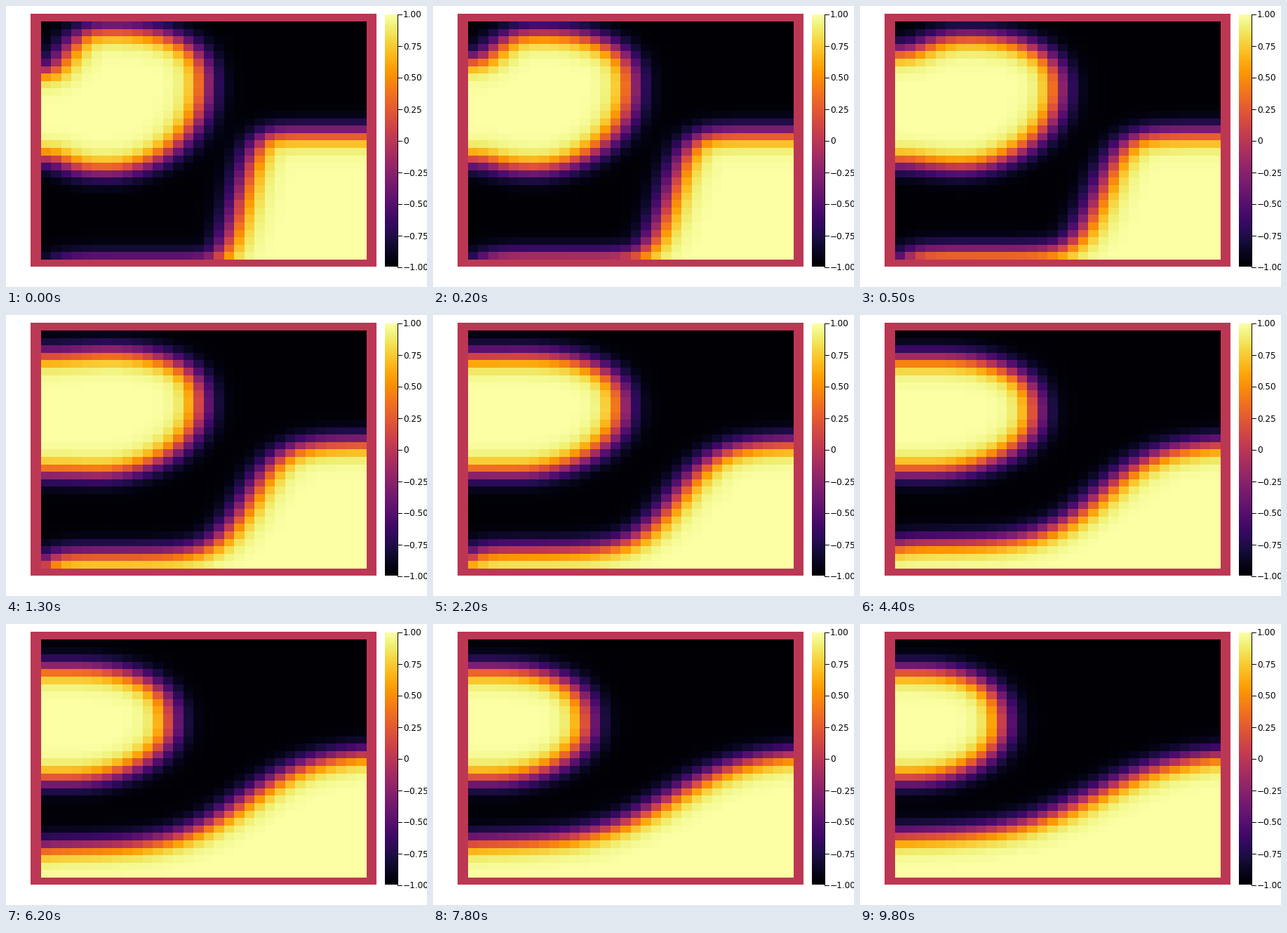
These frames come from a looping animation (600 by 400 pixels, 10 s). A matplotlib script:

```python
import numpy as np
import matplotlib.pyplot as plt
from matplotlib.animation import FuncAnimation

N = 32                      # inner cells per side; a ring of zeros surrounds them
FRAMES, INTERVAL = 100, 100
SHARPNESS = 0.62            # steepness of the tanh profile across an interface

COL, ROW = np.meshgrid(np.arange(N), np.arange(N))


def decay(t, tau):
    return np.exp(-t / tau)


def interface(xs, ys, inside):
    """Tanh profile of the signed distance from each cell to a curve."""
    d2 = (COL[..., None] - xs) ** 2 + (ROW[..., None] - ys) ** 2
    return np.tanh(SHARPNESS * np.where(inside, 1, -1) * np.sqrt(d2.min(axis=-1)))


def drop(t):
    """Upper drop: flat core with a round cap that retreats to the left."""
    reach = min(15.6, 16 - 0.6 * t)
    core = 6 * decay(t, 6)
    centre = 11 - 3 * decay(t, 2.2)
    top = 2.95 + 0.07 * t - 2.35 * decay(t, 1.1)
    bottom = 18.65 - 0.04 * t + 0.9 * decay(t, 0.9)
    notch_width = 2.6 + 1.5 * t

    def height(x, edge, power, notch):
        x = np.abs(x)
        cap = np.clip((x - core) / (reach - core), 0, 1)
        round_off = (1 - cap ** power) ** (1 / power)
        return centre + (edge - centre) * round_off + notch * np.exp(-(x / notch_width) ** 2)

    upper = (top, 2.5, 5.4 * decay(t, 0.5))
    lower = (bottom, 2, -1.6 * decay(t, 0.6))
    x = reach * np.sin(np.linspace(-np.pi / 2, np.pi / 2, 400))
    inside = (COL < reach) & (ROW > height(COL, *upper)) & (ROW < height(COL, *lower))
    return interface(np.r_[x, x], np.r_[height(x, *upper), height(x, *lower)], inside)


def slope(t):
    """Lower region: an S-shaped front that flattens by diffusion."""
    right = 14.55
    left = 29.85 - 0.4 * t + 2 * decay(t, 0.6)
    middle = 20.3 - 0.11 * t - 1.2 * decay(t, 0.8)
    width = np.sqrt(0.64 + 1.7 * t)

    def height(x):
        x = np.abs(x)
        lag = 2.5 * decay(t, 2) * np.exp(-x)
        return right + (left - right) / (1 + np.exp((x - middle) / width)) + lag

    x = np.linspace(-4, 36, 800)
    return interface(x, height(x), ROW > height(COL))


def field(t):
    return np.pad(np.clip(drop(t) + slope(t) + 1, -1, 1), 1)


fig = plt.figure(figsize=(6, 4), dpi=100, facecolor="white")
ax = fig.add_axes([0, 0, 1, 1])
style = dict(cmap="inferno", vmin=-1, vmax=1, antialiased=False)
cells = np.arange(N + 3)
heat = ax.pcolormesh(np.round(35.49 + 14.5 * cells), np.round(11.48 + 360 / 34 * cells),
                     field(0), **style)
ax.pcolormesh([540, 558], np.linspace(12, 371, 257),
              np.linspace(1, -1, 256)[:, None], **style)

AXIS = 557.5
ax.plot([AXIS, AXIS], [11.5, 371.5], color="black", lw=0.72)
for value in np.linspace(-1, 1, 9):
    y = 191.5 - 180 * value
    label = f"{value:.2f}".replace("-", "\u2212") if value else "0"
    ax.plot([AXIS, 564], [y, y], color="black", lw=0.72)
    ax.text(566, y, label, fontsize=8.7, family="DejaVu Sans",
            va="center_baseline", ha="left")
ax.set(xlim=(0, 600), ylim=(400, 0))
ax.axis("off")


def draw(i):
    heat.set_array(field(i * INTERVAL / 1000))
    return [heat]


anim = FuncAnimation(fig, draw, frames=FRAMES, interval=INTERVAL,
                     repeat=True, repeat_delay=0, blit=False)
plt.show()
```
